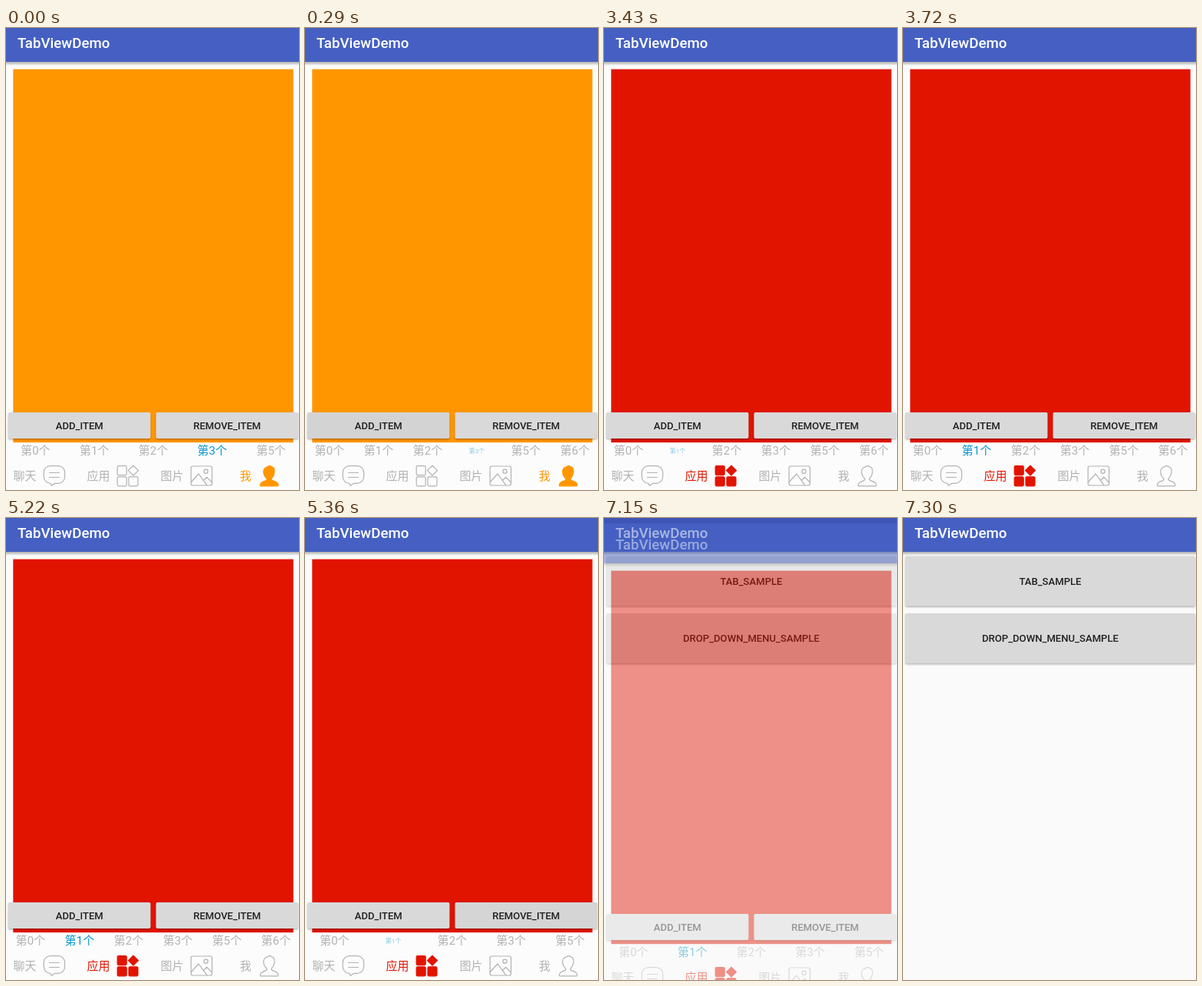
Animation, 382 px wide and 601 px high, one loop 8000 ms. Source, as an HTML page:

```html
<!DOCTYPE html>
<html lang="zh">
<head>
<meta charset="utf-8">
<title>TabViewDemo</title>
<style>
html, body { margin: 0; height: 100%; overflow: hidden; background: #fafafa; }
svg { display: block; }
text { font: 15px Roboto, "Noto Sans CJK SC", "Noto Sans CJK", sans-serif; }
.title { font-size: 18.7px; font-weight: 500; fill: #fff; }
.label { font-size: 13.1px; font-weight: 500; fill: #212121; text-anchor: middle; }
#tabs text { text-anchor: middle; }
.icon { stroke-width: 1.2; stroke-linejoin: round; stroke-linecap: round; }
</style>
</head>
<body>
<svg id="stage" width="382" height="601" viewBox="0 0 382 601"></svg>
<script>
const GREY = '#b2b2b2', BLUE = '#0896cc', ORANGE = '#ff9600', RED = '#e11400';
const $ = id => document.getElementById(id);

const rect = (x, y, w, h, fill, more = '') =>
  `<rect x="${x}" y="${y}" width="${w}" height="${h}" fill="${fill}" ${more}/>`;

const button = (x, y, w, h, label, id) =>
  rect(x, y + 1.5, w, h, '#000', 'rx="2" opacity=".28" filter="url(#soft)"') +
  rect(x, y, w, h, '#d9d9d9', `rx="2" id="${id}"`) +
  `<text class="label" x="${x + w / 2}" y="${y + h / 2 + 4.7}">${label}</text>`;

const bar = () =>
  rect(0, 44, 382, 5, 'url(#shade)') +
  rect(0, -20, 382, 12, '#3648a6') +
  rect(0, -8, 382, 52, '#4560c2') +
  '<text class="title" x="15" y="25.5">TabViewDemo</text>';

const navItem = (id, x, label, shape) =>
  `<g id="${id}"><text x="${x}" y="588">${label}</text><g class="icon">${shape}</g></g>`;

const box = (x, y) => `<rect x="${x}" y="${y}" width="12" height="12" rx="1.5"/>`;

$('stage').innerHTML = `
<defs>
  <linearGradient id="shade" x2="0" y2="1">
    <stop stop-color="#000" stop-opacity=".32"/><stop offset="1" stop-color="#000" stop-opacity="0"/>
  </linearGradient>
  <filter id="soft" x="-5%" y="-20%" width="110%" height="150%"><feGaussianBlur stdDeviation="1"/></filter>
</defs>
<g id="home">
  ${rect(0, 0, 382, 601, '#fafafa')}
  ${button(3, 49.5, 378, 65, 'TAB_SAMPLE', 'b1')}
  ${button(3, 124, 378, 65, 'DROP_DOWN_MENU_SAMPLE', 'b2')}
  ${bar()}
</g>
<g id="sample">
  ${rect(0, -20, 382, 621, '#fcfcfc')}
  ${rect(9.3, 53.6, 365.4, 485.6, ORANGE, 'id="panel"')}
  ${bar()}
  ${button(3, 500, 185.5, 34, 'ADD_ITEM', 'add')}
  ${button(195.5, 500, 185.5, 34, 'REMOVE_ITEM', 'remove')}
  <g id="tabs"></g>
  ${navItem('chat', 9.5, '聊天', `
    <path d="M58 569.6h10a8.7 8.7 0 0 1 8.7 8.7v5.4a8.7 8.7 0 0 1-8.7 8.7h-4.5l-4.2 2.9-1.3-2.9
      a8.7 8.7 0 0 1-8.7-8.7v-5.4a8.7 8.7 0 0 1 8.7-8.7z"/><path d="M56.5 578.5h13M56.5 584.5h13"/>`)}
  ${navItem('apps', 105.5, '应用', box(145.2, 569.6) + box(145.2, 583.8) + box(160, 583.8) +
    '<path d="M166 569.2l6.6 6.4-6.6 6.4-6.6-6.4z"/>')}
  ${navItem('pics', 201.5, '图片', `
    <rect x="241.2" y="570" width="27.4" height="25" rx="2.2"/><circle cx="260.6" cy="576.8" r="2.6"/>
    <path d="M241.5 590.5l9.6-10.5 11 14.8M257.5 588.5l4.4-4.2 6.5 6.7"/>`)}
  ${navItem('me', 304.7, '我', `
    <path d="M340 586.2c-2.4-1.8-3.7-4.6-4.1-7.2-.9-5 2-7.6 5-8.2 1.6-1.6 4.2-1.3 5.2-.2 3.3.6 4.5 3.6 3.8 8
      -.4 2.8-1.7 5.6-3.9 7.6-.3 1.8.6 2.4 2.4 2.9 4.4 1.2 6.6 2.4 6.6 5.6 0 .8-.4 1.1-1.2 1.1h-21.2
      c-.8 0-1.2-.4-1.1-1.2.2-3.2 2.5-4.3 6.4-5.4 1.8-.5 2.5-1.2 2.1-3z"/>`)}
</g>`;

function paintNav(id, color) {
  const item = $(id), icon = item.querySelector('.icon');
  item.setAttribute('fill', color || GREY);
  icon.setAttribute('fill', color || 'none');
  icon.setAttribute('stroke', color || GREY);
}

// The selected label pops in from small and pale in two steps.
function pop(age) {
  if (age < 145) return [.53, .5];
  return age < 290 ? [.9, .9] : [1, 1];
}

function drawTabs(names, selected, age) {
  const [scale, alpha] = pop(age);
  $('tabs').innerHTML = names.map((n, i) => {
    const x = (i + .5) * 384 / names.length;
    const on = n === selected;
    return `<text y="5.5" fill="${on ? BLUE : GREY}" opacity="${on ? alpha : 1}"
      transform="translate(${x} 549.6) scale(${on ? scale : 1})">第${n}个</text>`;
  }).join('');
}

const ADD = 290, SWITCH = 3430, REMOVE = 5360, LEAVE = 7150, HOME = 7300;
let last = '';

function draw(t) {
  const six = t >= ADD && t < REMOVE, red = t >= SWITCH;
  const start = [REMOVE, SWITCH, ADD].find(s => t >= s) ?? -1000;
  const age = t - start;
  const leaving = t >= LEAVE;
  const key = [start, pop(age), leaving, t >= HOME].join();
  if (key === last) return;
  last = key;

  const page = $('sample');
  page.setAttribute('display', t < HOME ? 'inline' : 'none');
  page.setAttribute('opacity', leaving ? .456 : 1);
  page.setAttribute('transform', `translate(0 ${leaving ? 15 : 0})`);
  $('panel').setAttribute('fill', red ? RED : ORANGE);
  $('add').setAttribute('fill', six && !red ? '#d3d3d3' : '#d9d9d9');
  $('remove').setAttribute('fill', t >= REMOVE && !leaving ? '#d5d5d5' : '#d9d9d9');
  drawTabs(six ? [0, 1, 2, 3, 5, 6] : [0, 1, 2, 3, 5], red ? 1 : 3, age);
  paintNav('apps', red && RED);
  paintNav('me', !red && ORANGE);
}

paintNav('chat');
paintNav('pics');
const begin = performance.now();
(function tick() {
  draw((performance.now() - begin) % 8000);
  requestAnimationFrame(tick);
})();
</script>
</body>
</html>
```
